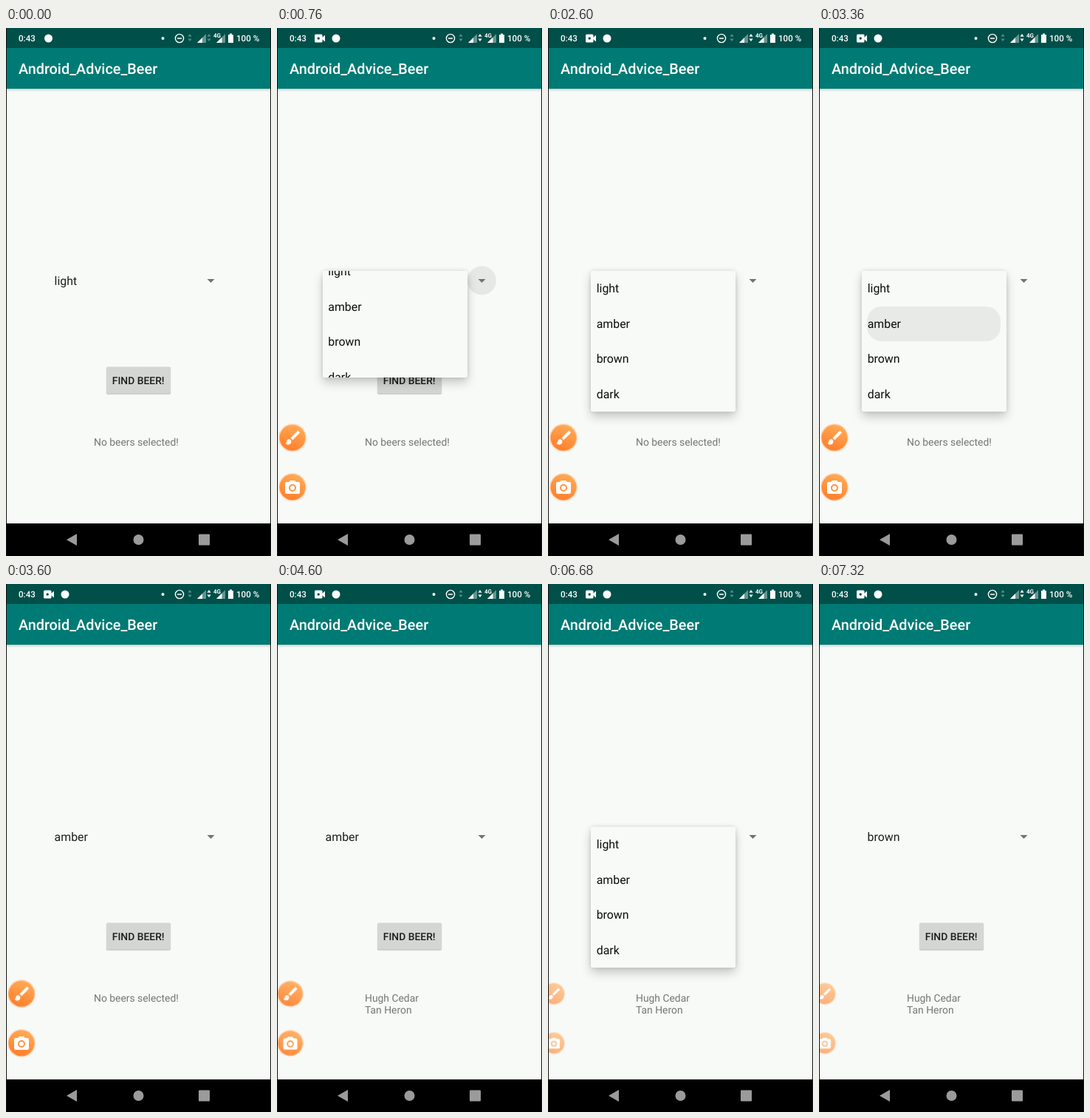
Recreate the animation shown at these times as an HTML page. Size 359 by 713 pixels, loop 8000 ms.

```html
<!DOCTYPE html>
<html lang="en">
<head>
<meta charset="utf-8">
<title>Beer advice</title>
<style>
html, body { margin: 0; width: 100%; height: 100%; overflow: hidden; background: #f8faf7; }
body { position: relative; font-family: Roboto, "Noto Sans", sans-serif; }
svg { position: absolute; left: 0; top: 0; display: block; }
text { text-rendering: geometricPrecision; }
.title { font: 500 19.83px Roboto, sans-serif; fill: #fff; }
.bar { font: 500 11.6px Roboto, sans-serif; fill: #fff; }
.value { font-size: 15.87px; fill: #1d1e1d; }
.label { font: 500 13.88px Roboto, sans-serif; fill: #1b1c1b; }
.result { font-size: 13.88px; fill: #747674; }

/* One loop is 8 s, so 1% is 80 ms */
.step { animation: 8s step-end infinite; }
.flow { animation: 8s linear infinite; }

.idle { animation-name: idle; }
@keyframes idle { 0% { opacity: 1 } 1%, 100% { opacity: 0 } }
.recording { animation-name: recording; }
@keyframes recording { 0% { opacity: 0 } 1%, 100% { opacity: 1 } }

.light { animation-name: light; }
@keyframes light { 0% { opacity: 1 } 43.5%, 100% { opacity: 0 } }
.amber { animation-name: amber; }
@keyframes amber { 0% { opacity: 0 } 43.5% { opacity: 1 } 87%, 100% { opacity: 0 } }
.brown { animation-name: brown; }
@keyframes brown { 0% { opacity: 0 } 87%, 100% { opacity: 1 } }

.none { animation-name: none-picked; }
@keyframes none-picked { 0% { opacity: 1 } 48%, 100% { opacity: 0 } }
.found { animation-name: found; }
@keyframes found { 0% { opacity: 0 } 48%, 100% { opacity: 1 } }
.press { animation-name: press; }
@keyframes press { 0% { opacity: 0 } 47% { opacity: .06 } 48% { opacity: .12 } 50%, 100% { opacity: 0 } }

.ripple { animation-name: ripple; transform-origin: 277.5px 341px; }
@keyframes ripple {
  0%, 5.5% { opacity: 0; transform: scale(.3) }
  7%, 10% { opacity: .07; transform: none }
  14% { opacity: 0; transform: none }
  67.4% { opacity: 0; transform: scale(.3) }
  69%, 72% { opacity: .08; transform: none }
  73.5%, 100% { opacity: 0; transform: none }
}

/* --c is how much of the list is still cut off at top and bottom */
.popup {
  position: absolute; top: 328px; left: calc(58px + var(--c) * .157px);
  width: 196px; height: calc(190px - var(--c) * 2px);
  overflow: hidden; border-radius: 2px; background: #f8faf7;
  box-shadow: 0 7px 14px rgba(0,0,0,.2), 0 0 6px rgba(0,0,0,.12);
  animation-name: popup;
}
@keyframes popup {
  0% { --c: 71; opacity: 0 }
  7.5% { --c: 71; opacity: .4 }
  8% { --c: 62; opacity: .75 }
  8.5% { --c: 50; opacity: .92 }
  9% { --c: 36; opacity: .97 }
  9.5% { --c: 23; opacity: 1 }
  10% { --c: 9; opacity: 1 }
  11% { --c: 0; opacity: 1 }
  43.5% { --c: 0; opacity: .45 }
  45% { --c: 71; opacity: 0 }
  69% { --c: 71; opacity: .4 }
  70% { --c: 57; opacity: .75 }
  70.5% { --c: 45; opacity: .92 }
  72% { --c: 10; opacity: 1 }
  73.5% { --c: 0; opacity: 1 }
  87% { --c: 0; opacity: .85 }
  88% { --c: 0; opacity: .5 }
  89% { --c: 0; opacity: .15 }
  90%, 100% { --c: 0; opacity: 0 }
}
.list { position: relative; margin-top: calc(var(--c) * -1px); }
.row {
  height: 47.5px; padding-left: 7.7px; line-height: 47.5px;
  font-size: 15.87px; color: #0c0d0c; text-rendering: geometricPrecision;
}
.mark {
  position: absolute; left: 7px; width: 181px; height: 47.5px;
  border-radius: 20px; background: #000;
}
.mark-amber { top: 47.5px; animation-name: mark-amber; }
@keyframes mark-amber { 0% { opacity: 0 } 42% { opacity: .06 } 45%, 100% { opacity: 0 } }
.mark-brown { top: 95px; animation-name: mark-brown; }
@keyframes mark-brown { 0% { opacity: 0 } 84.5% { opacity: .06 } 90%, 100% { opacity: 0 } }

.float { animation-name: dock; }
@keyframes dock {
  0%, .5% { opacity: 0; transform: none }
  4% { opacity: 1; transform: none }
  55.5% { opacity: 1; transform: none; animation-timing-function: ease-in-out }
  61.5%, 100% { opacity: .6; transform: translateX(-13px) scale(.8) }
}
</style>
</head>
<body>
<svg width="359" height="713" viewBox="0 0 359 713">
  <defs>
    <linearGradient id="shade" x2="0" y2="1">
      <stop stop-color="#000" stop-opacity=".17"/><stop offset="1" stop-color="#000" stop-opacity="0"/>
    </linearGradient>
    <path id="signal" d="M0 12 12 0V12Z"/>
    <path id="updown" d="M-2.6 -1.5 0 -5 2.6 -1.5ZM-2.6 1.5 0 5 2.6 1.5Z"/>
  </defs>
  <rect width="359" height="713" fill="#f8faf7"/>
  <rect y="82" width="359" height="4" fill="url(#shade)"/>
  <rect width="359" height="82" fill="#007a74"/>
  <rect width="359" height="27" fill="#004f49"/>
  <text class="title" x="17" y="62">Android_Advice_Beer</text>

  <!-- status bar -->
  <text class="bar" x="17" y="18">0:43</text>
  <g fill="#fff">
    <circle class="step idle" cx="57.5" cy="14" r="5.5"/>
    <g class="step recording">
      <circle cx="80" cy="14" r="5.5"/>
      <rect x="51" y="8.5" width="10.5" height="11" rx="1.5"/>
      <path d="M61 13 65 9.5V18.5L61 15Z"/>
      <circle cx="56.2" cy="14" r="1.7" fill="#004f49"/>
    </g>
    <circle cx="212.5" cy="14" r="2"/>
    <path d="M232 14h6" stroke="#fff" stroke-width="1.5"/>
    <circle cx="235" cy="14" r="5.6" fill="none" stroke="#fff" stroke-width="1.4"/>
    <use href="#updown" x="249" y="13" opacity=".35"/>
    <use href="#signal" x="259" y="8" opacity=".4"/>
    <path d="M259 20 266 13V20Z"/>
    <use href="#updown" x="275" y="13" opacity=".35"/>
    <use class="step recording" href="#updown" x="275" y="13"/>
    <text x="281" y="12.5" font-size="8" font-weight="700">4G</text>
    <use href="#signal" x="285" y="8" opacity=".4"/>
    <path d="M285 20 292.5 12.5V20Z"/>
    <path d="M303 7.5h3V9h2v11h-7V9h2Z"/>
  </g>
  <text class="bar" x="312" y="18">100 %</text>

  <!-- spinner -->
  <circle class="flow ripple" cx="277.5" cy="341" r="19.5"/>
  <path d="M272.5 339h10l-5 5Z" fill="#717371"/>
  <g class="value">
    <text class="step light" x="65.6" y="347.2">light</text>
    <text class="step amber" x="65.6" y="347.2">amber</text>
    <text class="step brown" x="65.6" y="347.2">brown</text>
  </g>

  <!-- button and result -->
  <rect x="135.5" y="458" width="88" height="37.2" rx="2.5" opacity=".07"/>
  <rect x="136" y="458" width="87" height="36.5" rx="2" opacity=".16"/>
  <rect x="136" y="457.5" width="87" height="36" rx="2" fill="#d4d6d3"/>
  <rect class="step press" x="136" y="457.5" width="87" height="36" rx="2"/>
  <text class="label" x="143.8" y="480.8">FIND BEER!</text>
  <g class="result">
    <text class="step none" x="119" y="563.6">No beers selected!</text>
    <g class="step found">
      <text x="119" y="563.6">Hugh Cedar</text>
      <text x="119" y="580">Tan Heron</text>
    </g>
  </g>

  <!-- navigation bar -->
  <rect y="669" width="359" height="44"/>
  <g fill="#9b9b9b">
    <path d="M82 691 96 683V699Z"/>
    <circle cx="179.5" cy="691" r="7"/>
    <rect x="261" y="683.5" width="15" height="15" rx="1"/>
  </g>
</svg>

<div class="popup step">
  <div class="list">
    <div class="mark mark-amber step"></div>
    <div class="mark mark-brown step"></div>
    <div class="row">light</div>
    <div class="row">amber</div>
    <div class="row">brown</div>
    <div class="row">dark</div>
  </div>
</div>

<svg width="359" height="713" viewBox="0 0 359 713">
  <defs>
    <linearGradient id="orange" x1=".7" y1="0" x2=".3" y2="1">
      <stop stop-color="#ffac58"/><stop offset="1" stop-color="#ff7d2b"/>
    </linearGradient>
    <g id="disc">
      <circle r="19" fill="#ffd8bb"/>
      <circle r="17.5" fill="url(#orange)"/>
    </g>
  </defs>
  <g transform="translate(21 553.3)">
    <g class="flow float">
      <use href="#disc"/>
      <path fill="#fff" transform="scale(1.04) translate(-11.5 -12)" d="M7 14c-1.66 0-3 1.34-3 3 0 1.31-1.16 2-2 2 .92 1.22 2.49 2 4 2 2.21 0 4-1.79 4-4 0-1.66-1.34-3-3-3zm13.7-9.4-1.3-1.3a1 1 0 0 0-1.4 0L9 12.25 11.75 15l8.95-9a1 1 0 0 0 0-1.4z"/>
    </g>
  </g>
  <g transform="translate(21 620)">
    <g class="flow float">
      <use href="#disc"/>
      <path fill="#fff" d="M-3-9-4.8-7H-8q-2 0-2 2V7q0 2 2 2H8q2 0 2-2V-5q0-2-2-2H4.8L3-9Z"/>
      <circle cy="1" r="4" fill="#fff" stroke="#ff9440" stroke-width="2"/>
    </g>
  </g>
  <path d="M.5 0V713M358.5 0V713" stroke="#111"/>
</svg>
</body>
</html>
```
